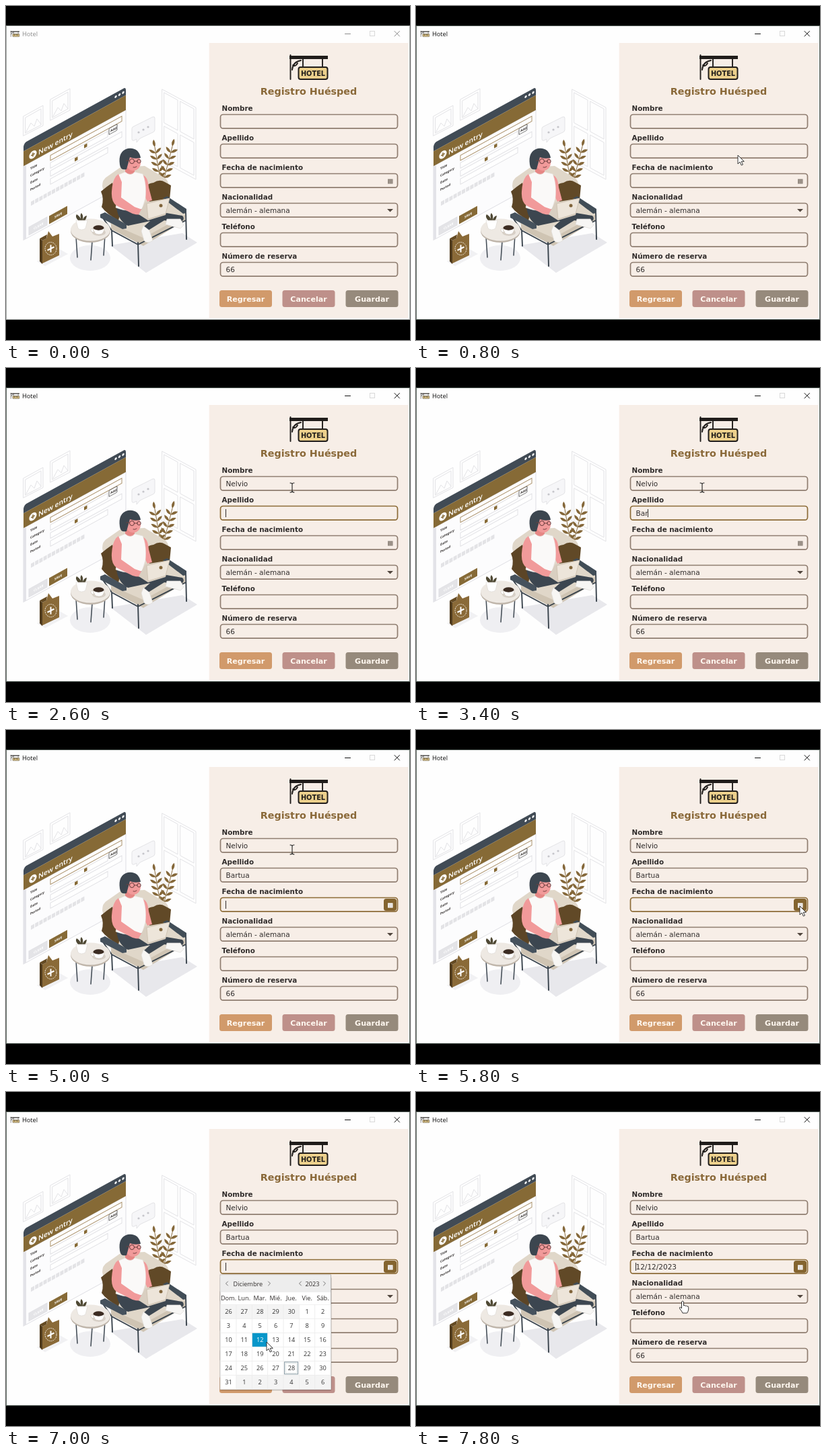
An HTML page that plays this animation: 600x497 px, repeating every 8000 ms.

```html
<!DOCTYPE html>
<html lang="es">
<head>
<meta charset="utf-8">
<title>Hotel</title>
<style>
  html, body { margin: 0; width: 100%; height: 100%; overflow: hidden; background: #000; }
  svg { display: block; width: 100vw; height: 100vh; }
  text { font-family: "DejaVu Sans", sans-serif; font-size: 10.5px; fill: #302c2b; white-space: pre; }
  .bold { font-weight: bold; }
  .label { font-weight: bold; font-size: 10.35px; }
  .button { font-weight: bold; font-size: 11.1px; fill: #fff8f0; text-anchor: middle; }
  .ui, #popup text { font-family: "Open Sans", sans-serif; font-size: 9.2px; }
  #popup .day { text-anchor: middle; }
  #board text { font: bold 4.7px "Open Sans", sans-serif; }
  .line { fill: none; stroke-linecap: round; stroke-linejoin: round; }
</style>
</head>
<body>
<svg viewBox="0 0 600 497">
  <rect id="border" x=".5" y="29.500" width="599" height="437" fill="#fefefe"/>
  <rect x="301.700" y="55" width="295.800" height="409.500" fill="#f7eee7"/>

  <!-- title bar -->
  <use href="#sign" transform="translate(-90 20.500) scale(.23)"/>
  <g id="titleBar">
    <text class="ui" x="24" y="45" style="fill:currentColor">Hotel</text>
    <path class="line" d="M503.500 41.500H511.500M577 37.500L584.500 45M584.500 37.500L577 45" stroke="currentColor"/>
  </g>
  <rect x="540.500" y="37.500" width="7" height="7" fill="none" stroke="#d9d9d9"/>

  <!-- wall -->
  <g class="line" stroke="#e3e3e6">
    <path d="M26 164L55 148V178L26 193ZM29 166L52 153V177L29 189ZM30 187L37 174L42 179L46 168L52 176"/>
    <path d="M66 139L95 123V155L66 170ZM69 141L92 128V153L69 166ZM70 164L77 151L82 156L86 145L92 153"/>
    <path d="M232 124L282 151V258L232 231ZM235 129L255 140V185L235 174ZM259 142L279 153V198L259 187ZM235 179L255 190V239L235 228ZM259 192L279 203V252L259 241Z"/>
    <path d="M187 182Q187 180 190 179L218 165Q221 164 221 167V184Q221 187 218 188L199 197L194 203V198L190 200Q187 201 187 198Z" fill="#f6f6f8"/>
  </g>
  <g fill="#c5c5ca"><circle cx="197" cy="188" r="1.600"/><circle cx="204" cy="184" r="1.600"/><circle cx="211" cy="180" r="1.600"/></g>

  <!-- floor -->
  <path d="M155 356L208 397L284 352L262 338Z" fill="#e8e8ec"/>
  <ellipse cx="125" cy="375" rx="30" ry="19" fill="#efeff2"/>
  <path d="M46 380L80 362L92 369L58 387Z" fill="#f1f1f3"/>

  <!-- entry form board -->
  <g id="board" transform="matrix(1 -.55 0 1 26 216.300)">
    <rect y="22" width="152" height="110" fill="#fcfcfd" stroke="#dedee3"/>
    <path d="M0 23H4V132H0Z" fill="#e3e3e8"/>
    <path d="M0 0V-7Q1 -12 5 -12H148Q152 -12 152 -8V0Z" fill="#414b55"/>
    <rect width="152" height="22" fill="#866a36"/>
    <g fill="#fff"><circle cx="137" cy="-6" r="1.700"/><circle cx="142.500" cy="-6" r="1.700"/><circle cx="148" cy="-6" r="1.700"/><circle cx="14" cy="12.500" r="5.600"/></g>
    <path d="M11 12.500H17M14 9.500V15.500" stroke="#866a36" stroke-width="1.600"/>
    <text x="22" y="17.500" style="font:600 10.200px 'Open Sans',sans-serif;fill:#fff">New entry</text>
    <g fill="#fff" stroke="#dedee2" stroke-width=".9">
      <rect x="40" y="28" width="106" height="7.500" stroke="#a3875c"/>
      <rect x="40" y="39" width="85" height="8"/>
      <rect x="40" y="51" width="106" height="8"/>
      <rect x="40" y="63" width="85" height="8"/>
      <rect x="127" y="36" width="12" height="9" rx="1" stroke="#555"/>
      <rect x="8" y="117" width="27" height="12" fill="#e4e4e7"/>
    </g>
    <g fill="#866a36"><rect x="90" y="40" width="4.500" height="5"/><rect x="76" y="52" width="4.500" height="5"/><rect x="38" y="117" width="27" height="12"/></g>
  </g>
  <g stroke="#765729" fill="#8a6a38">
    <path d="M50 346L54 349V384L50 380Z" fill="#503b1d" stroke="none"/>
    <path d="M54 349L60 346L63 335L69 343L79 339V371L54 383Z" stroke="none"/>
    <path d="M50 346L61 340L60 346L54 349Z" fill="#654b23" stroke="none"/>
    <ellipse cx="66.500" cy="361" rx="8.500" ry="9.500" stroke="#f0e8da" stroke-dasharray="2 1" fill="none"/>
    <path d="M61.500 363.500L71.500 358.500M66.500 355.500V366.500" stroke="#fff" stroke-width="2"/>
  </g>

  <!-- plant, then armchair -->
  <g id="plant" fill="#85683a" stroke="#85683a"></g>
  <g>
    <path d="M143 268Q143 258 150 254L170 240L206 238L236 256Q245 262 242 290L266 306V320L204 352L156 327Z" fill="#e0d7c9"/>
    <path d="M156 324L204 345L266 311V319L204 357L156 332Z" fill="#cfc4b3"/>
    <path d="M141 276Q149 269 158 263L171 303L167 319Q149 309 142 299Q146 287 141 276Z" fill="#5c4526"/>
    <path d="M203 277Q207 264 219 263Q228 257 236 262L245 267L243 288L214 292Z" fill="#614927"/>
    <path class="line" d="M145 317L157 334L196 355L267 319M196 352L197 387M157 334L158 357M267 305L268 347M242 285V292" stroke="#39434c" stroke-width="1.900"/>
    <path d="M233 286L239 283L268 302V308L263 309Z" fill="#414d57"/>
    <path d="M140 310L147 307L179 325V331L173 332L140 315Z" fill="#46525d"/>
  </g>

  <!-- woman with laptop -->
  <g>
    <path d="M164 299Q185 292 202 302L262 312Q267 318 258 322L235 319L211 334L205 328L214 320L181 327Q166 319 164 299Z" fill="#3c4650"/>
    <path d="M204 327L213 334L218 349Q210 355 205 349L201 335ZM239 317L259 317L264 326L259 331L237 325Z" fill="#f7f6f4" stroke="#dedbd7" stroke-width=".7"/>
    <path d="M177 238H191V251H177Z" fill="#e68785"/>
    <path d="M204 252Q211 255 212 270L217 289L210 291L203 277Z" fill="#f19a9a"/>
    <path d="M165 252L177 247Q185 254 191 247L203 250Q209 264 207 286L202 302Q183 308 163 300L167 278Z" fill="#faf9f8" stroke="#e8e4e1" stroke-width=".6"/>
    <path d="M167 250Q158 256 157 276Q156 291 164 297L188 309Q198 312 207 309L205 304L191 299L171 285L172 262Z" fill="#f19a9a"/>
    <ellipse cx="189" cy="233" rx="11" ry="12" fill="#f19a9a"/>
    <path d="M169 236Q166 216 181 212Q197 210 200 226Q190 228 184 225L179 243Q170 245 169 236Z" fill="#3c464f"/>
    <path class="line" d="M179 230H183M190.500 231H195M189 240Q192 241 194 239" stroke="#713e3d"/>
    <g fill="none" stroke="#63393a"><circle cx="187" cy="231" r="3.500"/><circle cx="197.500" cy="231" r="2.700"/></g>
    <path d="M197 310L207 292L243 286L237 311L211 319Z" fill="#d9cfc1"/>
    <path d="M209 294L243 286L237 309L211 317Z" fill="#ede5da" stroke="#c9bcaa" stroke-width=".7"/>
    <circle cx="230" cy="297" r="2.500" fill="#80643a"/>
  </g>

  <!-- side table -->
  <path class="line" d="M104 343L106 374M128 350L126 378M147 340L145 371" stroke="#48515a" stroke-width="1.600"/>
  <ellipse cx="125.500" cy="335" rx="29.500" ry="17" fill="#bfb5aa"/>
  <ellipse cx="125.500" cy="333" rx="29.500" ry="16.500" fill="#eee9e3"/>
  <path d="M112 323Q101 315 105 310Q111 314 112 319Q109 311 112 308Q116 313 113 320Q116 312 120 312Q119 320 112 323Z" fill="#4f4934"/>
  <path d="M104 319H121L118 331Q112 335 107 331Z" fill="#fff" stroke="#d9d5d0" stroke-width=".6"/>
  <ellipse cx="138" cy="337" rx="10" ry="5" fill="#d7cfc6"/>
  <path d="M129 330H146Q146 340 138 340Q130 340 129 330M130 332Q124 330 127 336L132 337" fill="#fff" stroke="#d0c8be" stroke-width=".8"/>
  <ellipse cx="137.500" cy="330" rx="8" ry="3.700" fill="#3c2c22"/>

  <!-- hotel sign -->
  <g id="sign">
    <path class="line" d="M422.500 73V109M425 95Q426 83 438 81M426 88Q430 91 433 85M441 77V90M470 77V90" stroke="#201d1b" stroke-width="1.900"/>
    <path d="M421 74H478V79H421Z" fill="#201d1b"/>
    <rect x="434.500" y="91" width="43" height="18" rx="3" fill="#ecd08c" stroke="#201d1b" stroke-width="2"/>
    <text x="456" y="103.700" text-anchor="middle" class="bold" style="font-size:9.800px;fill:#201d1b">HOTEL</text>
  </g>
  <text class="bold" x="449.500" y="132" text-anchor="middle" style="font-size:14.300px;fill:#8a6939">Registro Huésped</text>

  <g id="form"></g>
  <path d="M566 302H575L570.500 306.500Z" fill="#51463e"/>
  <rect id="dateButton" x="561" y="251" width="19" height="18" rx="3.500" fill="#84642f"/>
  <g id="dateIcon"><path d="M567 257.500H574.500V264.500H567Z" fill="currentColor"/><path d="M567 259.500H574.500M569.500 260V264M572 260V264M567 262H574" stroke="#b5aaa0" stroke-width=".5"/></g>
  <path id="caret" stroke="#302c2b"/>

  <g id="popup">
    <rect x="317" y="275" width="167" height="170" rx="3" fill="#0001"/>
    <rect x="318" y="275" width="165.500" height="169" rx="2" fill="#0002"/>
    <rect x="318" y="272" width="164.500" height="170.500" fill="#fff" stroke="#b7b4b2"/>
    <rect x="318.500" y="272.500" width="163.500" height="25.500" fill="#ededed"/>
    <text x="337.500" y="289">Diciembre</text>
    <text x="444.500" y="289">2023</text>
    <path class="line" d="M329.500 282L326.500 285L329.500 288M389.500 282L392.500 285L389.500 288M438.500 282L435.500 285L438.500 288M471.500 282L474.500 285L471.500 288" stroke="#777"/>
    <g id="days"></g>
  </g>

  <g id="cursors">
    <path id="ibeam" class="line" d="M-3 -7Q0 -7 0 -5Q0 -7 3 -7M0 -5V5M-3 7Q0 7 0 5Q0 7 3 7" stroke="#222" stroke-width="1.100"/>
    <path id="arrow" d="M0 0V13L3 10L5.300 15L7.500 14L5.200 9.300H9.300Z" fill="#fff" stroke="#222" stroke-width=".9"/>
    <path id="hand" d="M-1.500 1Q0 -1 1.500 1V7Q3 5.500 4.200 7.500Q5.500 6.200 6.500 8Q8.500 7 8.700 9.500V13Q8 16 6.500 18H0Q-1 15 -4 12Q-5.500 9 -3.500 9L-1.500 11Z" fill="#fff" stroke="#222" stroke-width=".9"/>
  </g>
</svg>
<script>
const $ = id => document.getElementById(id);
const LOOP = 8000, STEP = 200;

// Leaves alternate along a straight stem.
function sprig(x0, y0, x1, y1, pairs) {
  let out = `<path class="line" d="M${x0} ${y0}L${x1} ${y1}"/>`;
  const lean = Math.atan2(x1 - x0, y0 - y1) * 180 / Math.PI;
  for (let i = 0; i <= pairs; i++) {
    const k = .15 + .85 * i / pairs, x = x0 + (x1 - x0) * k, y = y0 + (y1 - y0) * k;
    for (const turn of i === pairs ? [0] : [-52, 52])
      out += `<path d="M0 0Q-4.500 -6 0 -11.500Q3.500 -6 0 0Z" stroke="none" transform="translate(${x} ${y}) rotate(${lean + turn})"/>`;
  }
  return out;
}
$('plant').innerHTML = sprig(230, 264, 221, 210, 5) + sprig(233, 264, 247, 209, 5);

let board = '';
['Title', 'Category', 'Date', 'Period'].forEach((word, i) =>
  board += `<text x="10" y="${33 + i * 10.5}">${word}</text>`);
for (let i = 0; i < 13; i++)
  board += `<rect x="${11 + i * 6.2}" y="81" width="5" height="6" fill="#e3e3e6"/>`;
board += `<text x="129" y="42.500">Add</text>
  <text x="15" y="125" style="fill:#fff">CLEAR</text>
  <text x="46" y="125" style="fill:#fff">SAVE</text>`;
$('board').insertAdjacentHTML('beforeend', board);

const labels = ['Nombre', 'Apellido', 'Fecha de nacimiento', 'Nacionalidad', 'Teléfono', 'Número de reserva'];
const values = ['', '', '', 'alemán - alemana', '', '66'];
const buttons = [['Regresar', 317, '#d19a6b'], ['Cancelar', 410.5, '#be908a'], ['Guardar', 504.5, '#968a7c']];
$('form').innerHTML = labels.map((label, i) => `
  <text class="label" x="320.500" y="${155.7 + i * 44}">${label}</text>
  <rect id="box${i}" x="318.500" y="${161.5 + i * 44}" width="263" height="20.700" rx="4" fill="#f7eee7" stroke-width="1.700"/>
  <text id="value${i}" x="326.500" y="${176 + i * 44}">${values[i]}</text>`).join('') +
  buttons.map(([name, x, color]) => `
  <rect x="${x}" y="423" width="78" height="25" rx="3.500" fill="${color}"/>
  <text class="button" x="${x + 39}" y="439.500">${name}</text>`).join('');

const cellW = 23.35, cellH = 21;
let days = ['Dom.', 'Lun.', 'Mar.', 'Mié.', 'Jue.', 'Vie.', 'Sáb.'].map((name, i) =>
  `<text class="day" x="${330.5 + i * cellW}" y="310">${name}</text>`).join('');
for (let i = 0; i < 42; i++) {
  const x = 318.7 + i % 7 * cellW, y = 316.3 + Math.floor(i / 7) * cellH;
  const outside = i < 5 || i > 35;
  const day = i < 5 ? 26 + i : i > 35 ? i - 35 : i - 4;
  const id = outside ? '' : `day${day}`;
  days += `<g id="${id}" style="color:#333"><rect x="${x}" y="${y}" width="${cellW}" height="${cellH}" fill="${outside ? '#f4f4f4' : '#fff'}" stroke="#ececec" stroke-width=".7"/>
    ${id === 'day28' ? `<rect x="${x + 1.5}" y="${y + 1.5}" width="20" height="18" fill="none" stroke="#8497a0"/><rect x="${x + 3.2}" y="${y + 3.2}" width="16.600" height="14.600" fill="none" stroke="#9aa" stroke-width=".6" stroke-dasharray="1"/>` : ''}
    <text class="day" x="${x + 11.8}" y="${y + 13.3}" style="fill:currentColor">${day}</text></g>`;
}
$('days').innerHTML = days;
const picked = $('day12'), pickedCell = picked.querySelector('rect');

// Each track lists [start time, value...]; a value holds until the next entry.
const tracks = {
  focus: [[0, -1], [1400, 0], [2600, 1], [4600, 2]],
  name: [[0, ''], [1800, 'Nelv'], [2000, 'Nelvi'], [2200, 'Nelvio']],
  surname: [[0, ''], [3200, 'Ba'], [3400, 'Bar'], [3800, 'Bartu'], [4200, 'Bartua']],
  date: [[0, ''], [7600, '12/12/2023']],
  caret: [[0, false], [1400, true], [4800, false], [5000, true], [5600, false], [6800, true]],
  pointer: [[0, ''], [600, 'arrow', 520, 250], [800, 'arrow', 478, 222], [1000, 'ibeam', 440, 188],
    [1200, 'ibeam', 425, 178], [5400, 'arrow', 480, 199], [5600, 'arrow', 548, 246], [5800, 'arrow', 570, 262],
    [6400, 'arrow', 527, 290], [6600, 'arrow', 462, 335], [6800, 'arrow', 402, 369],
    [7000, 'arrow', 387, 372], [7600, 'arrow', 389, 350], [7800, 'hand', 396, 311]]
};
const at = (track, t) => tracks[track].findLast(key => key[0] <= t).slice(1);
const show = (id, visible) => $(id).style.display = visible ? '' : 'none';

function draw(now) {
  const t = Math.floor(now % LOOP / STEP) * STEP;
  const [focus] = at('focus', t), active = t >= 600;
  $('titleBar').style.color = active ? '#111' : '#8c8c8c';
  $('border').setAttribute('stroke', active ? '#56615a' : '#a0a5a2');

  ['name', 'surname', 'date'].forEach((track, i) => $('value' + i).textContent = at(track, t)[0]);
  labels.forEach((_, i) => $('box' + i).setAttribute('stroke', i === focus ? '#8c6b37' : '#8f7d70'));

  show('dateButton', focus === 2);
  $('dateIcon').style.color = focus === 2 ? '#fff' : '#8f857c';
  show('caret', at('caret', t)[0]);
  if (focus >= 0) {
    const x = 326.5 + (focus < 2 ? $('value' + focus).getComputedTextLength() : 0);
    $('caret').setAttribute('d', `M${x} ${166 + focus * 44}v12`);
  }

  const chosen = t >= 7000;
  show('popup', t >= 6400 && t < 7600);
  picked.style.color = chosen ? '#fff' : '#333';
  pickedCell.setAttribute('fill', chosen ? '#0796c9' : '#fff');

  const [kind, x, y] = at('pointer', t);
  for (const id of ['ibeam', 'arrow', 'hand']) show(id, id === kind);
  if (kind) $('cursors').setAttribute('transform', `translate(${x} ${y})`);
  requestAnimationFrame(draw);
}
requestAnimationFrame(draw);
</script>
</body>
</html>
```
